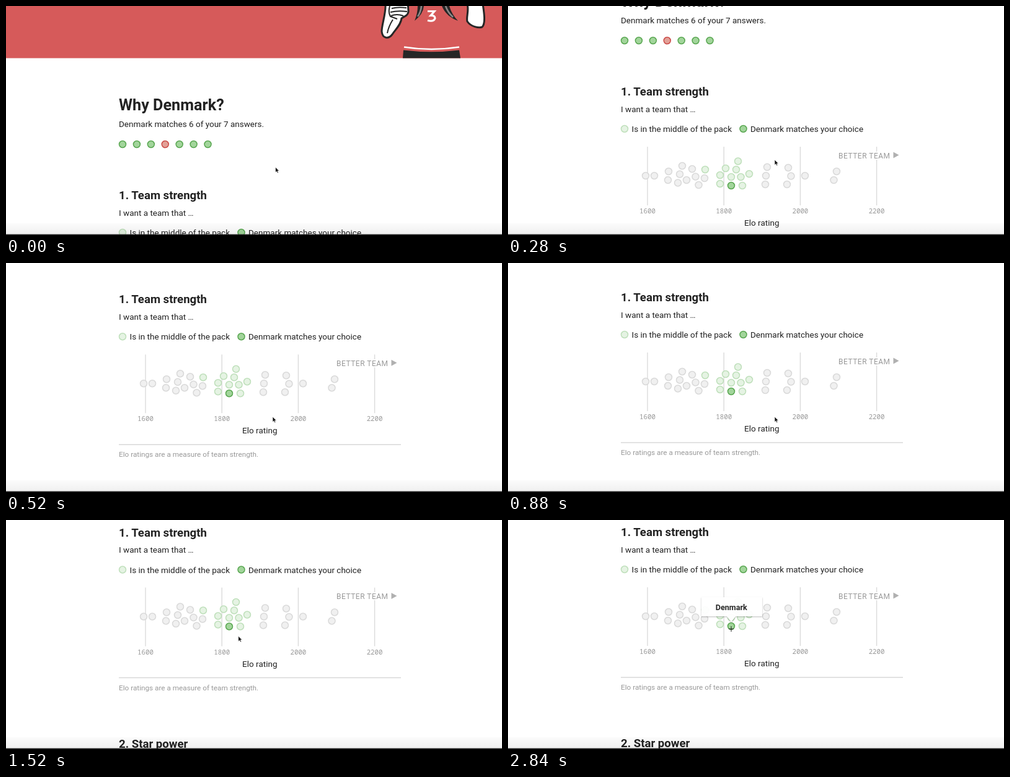
Recreate the animation shown at these times as an HTML page. Size 800 by 371 pixels, loop 2.88 s.

```html
<!DOCTYPE html>
<html lang="en">
<head>
<meta charset="utf-8">
<title>Why Denmark?</title>
<style>
  html, body { margin: 0; height: 100%; overflow: hidden; background: #fff; }
  svg { display: block; width: 100vw; height: 100vh; }
  text { font: 13.5px Roboto, sans-serif; fill: #222; }
  .title { font-weight: 700; font-size: 18.6px; }
  .big { font-weight: 700; font-size: 25.2px; }
  .mid { text-anchor: middle; }
  .tick { font: 10.8px "Noto Sans Mono", monospace; fill: #999; text-anchor: middle; }
  .note { font-size: 11.75px; fill: #999; }
  .better { font-size: 12px; letter-spacing: .5px; fill: #999; stroke: #fff; stroke-width: 4px; paint-order: stroke; }
  .tip { font-weight: 700; font-size: 12.6px; text-anchor: middle; }
  circle { stroke-width: 1.5; }
  .grey { fill: #f0f0f0; stroke: #d9d9d9; }
  .pale { fill: #e5f3e3; stroke: #bedfba; }
  .green { fill: #a2d59b; stroke: #58a650; }
  .red { fill: #e2a097; stroke: #cb4a47; }
  .skin { fill: #fff; stroke: #262626; stroke-width: 3; }
  .ink { fill: none; stroke: #262626; stroke-width: 2; }
  .dark { fill: #262626; }
  .white { fill: none; stroke: #fff; stroke-width: 2.6; }
  .grid { stroke: #d8d8d8; stroke-width: 1.3; }
</style>
</head>
<body>
<svg viewBox="0 0 800 371" preserveAspectRatio="none">
  <defs>
    <linearGradient id="fade" x2="0" y2="1">
      <stop stop-opacity=".015"/>
      <stop offset="1" stop-opacity=".06"/>
    </linearGradient>
    <filter id="shadow" x="-20%" y="-30%" width="140%" height="170%">
      <feDropShadow dx="0" dy="1" stdDeviation="1.3" flood-opacity=".28"/>
    </filter>
  </defs>

  <g id="page">
    <path fill="#d65a5a" d="M0 0H800V84.5H0Z"/>
    <path class="skin" d="M612 -3C613 12 606 30 606 41C607 53 617 54 623 46C629 37 637 30 638 20L646 15C652 9 647 5 649 -3Z"/>
    <path class="ink" d="M619 0Q616 10 620 17L631 21M622 4Q632 1 646 3M620 10Q632 7 647 9M621 16Q630 12 641 16M624 22Q617 33 615 44"/>
    <path class="skin" d="M744 -3C747 8 742 18 744 25C750 34 763 36 768 34C774 28 771 10 769 -3Z"/>
    <path class="dark" d="M664 0H674Q673 13 659 24Q664 12 664 0ZM703 0H715Q719 14 729 24Q710 17 703 0Z"/>
    <path class="white" d="M670 0Q669 10 664 17M709 0Q713 11 721 18" stroke-width="1" opacity=".45"/>
    <path class="white" d="M680 8.5H691L685 15.5Q692 15 692 20Q690 26 680 23.5" style="stroke-width:3.2"/>
    <path class="white" d="M642 66.5Q686 73.5 731 66.5"/>
    <path class="dark" d="M641 71.5Q686 77 731 71.5L733 84.5H640Z"/>

    <text class="big" x="182" y="169">Why Denmark?</text>
    <text x="182" y="196">Denmark matches 6 of your 7 answers.</text>

    <text class="title" x="182" y="313">1. Team strength</text>
    <text x="182" y="339.5">I want a team that …</text>
    <text x="199.5" y="372">Is in the middle of the pack</text>
    <text x="391" y="372">Denmark matches your choice</text>

    <g id="axis"></g>
    <text class="better" x="533" y="414.5">BETTER TEAM</text>
    <path fill="#b0b0b0" d="M621.5 404.5V414.5L630.5 409.5Z"/>
    <text class="mid" x="409.3" y="524">Elo rating</text>
    <path class="grid" d="M182 542H637"/>
    <text class="note" x="182" y="562">Elo ratings are a measure of team strength.</text>
    <text class="title" x="182" y="655">2. Star power</text>
    <g id="dots"></g>

    <g id="tooltip">
      <path fill="#fff" filter="url(#shadow)" d="M312 412H410V443H367L360 452L353 443H312Z"/>
      <text class="tip" x="360.3" y="432.5">Denmark</text>
    </g>
  </g>

  <path fill="url(#fade)" d="M0 352H800V370H0Z"/>
  <path fill="#222" d="M0 369.8H800V371H0Z"/>
  <path id="arrow" fill="#111" stroke="#fff" stroke-width=".7" d="M0 0V8.6L2 6.9L3.4 9.8L4.9 9.1L3.6 6.3H6.2Z"/>
  <path id="cross" stroke="#222" d="M356 176.5H364M360 172V181"/>
</svg>
<script>
const LOOP = 2880, STEP = 40;
const $ = id => document.getElementById(id);

function add(parent, tag, attrs, text = '') {
  const node = document.createElementNS('http://www.w3.org/2000/svg', tag);
  for (const key in attrs) node.setAttribute(key, attrs[key]);
  node.textContent = text;
  parent.append(node);
}
const dot = (cls, cx, cy) => add($('dots'), 'circle', { class: cls, cx, cy, r: 5.5 });

for (let i = 0; i < 7; i++) dot(i === 3 ? 'red' : 'green', 188 + i * 22.92, 224);
dot('pale', 188, 367);
dot('green', 379.5, 367);

for (let i = 0; i < 4; i++) {
  const x = 225 + i * 123.2;
  add($('axis'), 'path', { class: 'grid', d: `M${x} 396V491` });
  add($('axis'), 'text', { class: 'tick', x, y: 504 }, 1600 + i * 200);
}

// Team positions, relative to the top of the chart
const CHART_TOP = 287;
const teams = {
  grey: [[222, 156], [236, 156], [259, 149], [258, 163], [281, 140], [277, 153.5], [274, 167.5],
    [297, 145], [288, 163], [302.5, 157.5], [317, 160], [307.5, 171], [418, 142], [416, 156],
    [415, 170], [452, 143], [456.5, 156.5], [450, 170], [479, 156], [530, 149], [525.5, 163]],
  pale: [[318, 146], [342, 155], [342, 169], [351, 144], [371, 132.5], [368, 146], [360, 158],
    [375.5, 158], [389, 153], [378, 172]],
  green: [[360, 172]]
};
for (const cls in teams) for (const [x, y] of teams[cls]) dot(cls, x, y + CHART_TOP);

// Keyframes are [time, value]
const scrollKeys = [[0, 0], [40, 7], [160, 78], [280, 168], [340, 209], [400, 236], [480, 246], [560, 249.5],
  [800, 251], [880, 251], [920, 257], [1000, 281], [1040, 286.5], [1680, 286.5], [2040, 287]];
const mouseX = [[0, 434.5], [280, 430], [1120, 430], [1680, 361], [2040, 360]];
const mouseY = [[0, 261], [280, 249], [1120, 249], [1680, 173], [2040, 171]];

const linear = u => u;
const smooth = u => u * u * (3 - 2 * u);

function valueAt(keys, t, ease) {
  const i = keys.findIndex(key => key[0] > t);
  if (i < 0) return keys.at(-1)[1];
  const [t0, a] = keys[i - 1], [t1, b] = keys[i];
  return a + (b - a) * ease((t - t0) / (t1 - t0));
}

function draw(now) {
  const t = Math.floor(now % LOOP / STEP) * STEP;
  const hover = t >= 2600;
  $('page').setAttribute('transform', `translate(0 ${-valueAt(scrollKeys, t, linear)})`);
  $('arrow').setAttribute('transform', `translate(${valueAt(mouseX, t, smooth)} ${valueAt(mouseY, t, smooth)})`);
  $('arrow').setAttribute('visibility', hover ? 'hidden' : 'visible');
  $('cross').setAttribute('visibility', hover ? 'visible' : 'hidden');
  $('tooltip').setAttribute('opacity', hover ? (t - 2560) / 280 * 0.96 : 0);
}

const start = performance.now();
function tick() {
  draw(performance.now() - start);
  requestAnimationFrame(tick);
}
tick();
</script>
</body>
</html>
```
